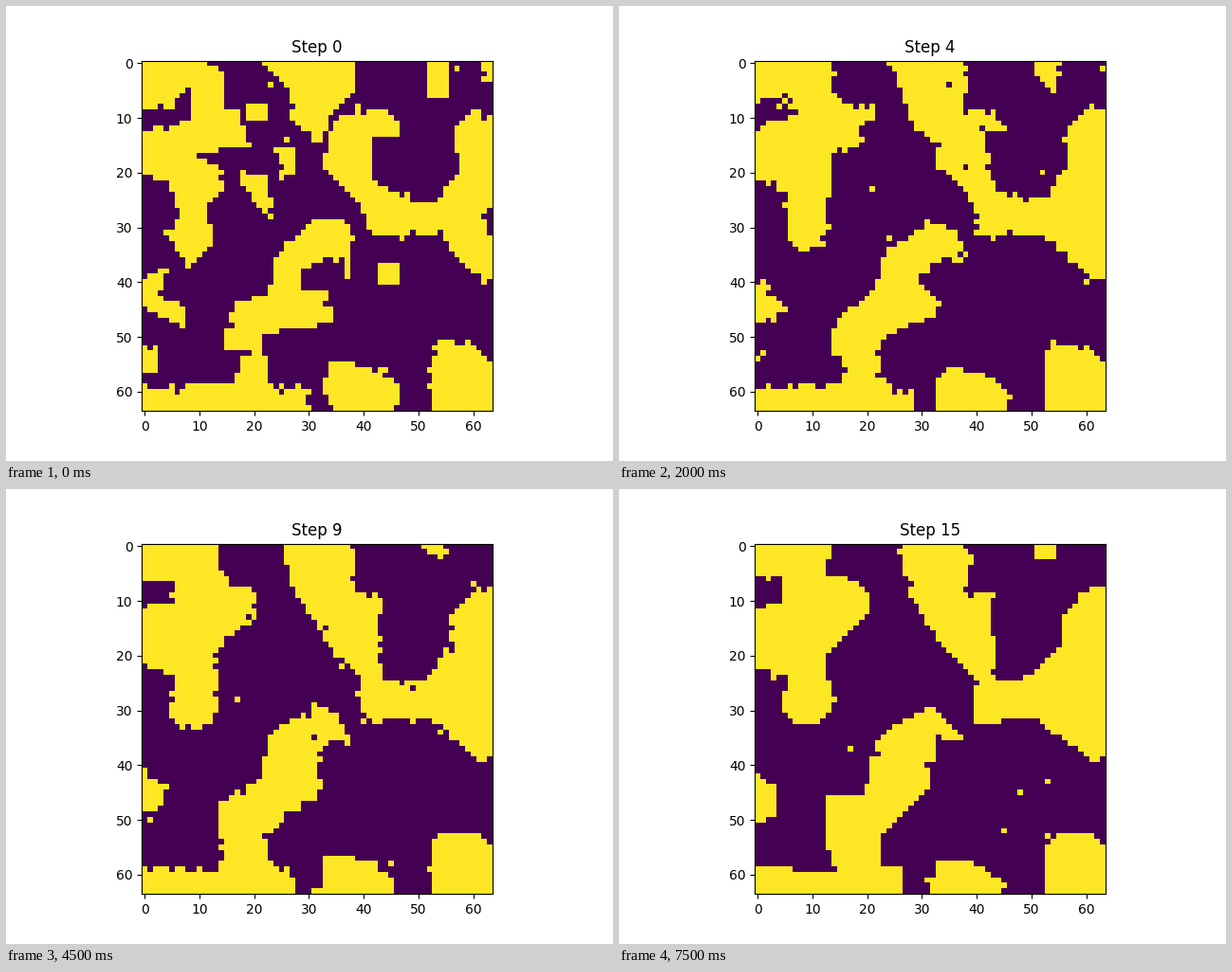
Recreate the animation shown at these times as a matplotlib script. Size 640 by 480 pixels, loop 8000 ms.

```python
import numpy as np
import matplotlib.pyplot as plt
from matplotlib.animation import FuncAnimation
from matplotlib.path import Path

N, STEPS = 64, 16
rows, cols = np.mgrid[:N, :N]
centers = np.column_stack([cols.ravel() + 0.5, rows.ravel() + 0.5])
cells = centers[:, 0] + 1j * centers[:, 1]


def blob(mask, *pts):
    mask |= Path(np.reshape(pts, (-1, 2))).contains_points(centers)


def box(mask, x, y, w, h):
    blob(mask, x, y, x + w, y, x + w, y + h, x, y + h)


def signed_distance(mask):
    gap = np.abs(cells[mask][:, None] - cells[~mask])
    field = np.empty(N * N)
    field[mask] = gap.min(axis=1) - 0.5
    field[~mask] = 0.5 - gap.min(axis=0)
    return field.reshape(N, N).clip(-3, 3)


# Domains at the first step
start = np.zeros(N * N, bool)
blob(start, 0,0, 12,0, 15,3, 15,9, 18,9, 19,16, 9,17, 15,20, 15,23, 12,26,
     13,34, 8,38, 7,34, 5,32, 7,28, 5,22, 0,21, 0,13, 9,11, 9,4, 5,8, 0,9)
blob(start, 22,0, 39,0, 39,6, 34,10, 33,15, 27,11, 27,6)
blob(start, 18,21, 23,21, 24,29, 22,28)
blob(start, 36,10, 43,9, 47,11, 47,14, 42,14, 42,22, 50,26, 54,26, 58,20,
     57,13, 60,9, 64,10, 64,28, 62,28, 64,33, 64,40, 62,40, 57,36, 55,32,
     42,32, 40,26, 33,20, 34,14)
blob(start, 32,29, 36,29, 38,31, 38,41, 36,36, 29,38, 29,42, 34,42, 35,48,
     22,50, 23,58, 25,61, 29,59, 31,64, 0,64, 0,60, 17,59, 19,53, 15,53,
     16,46, 24,41, 24,36)
blob(start, 0,40, 5,38, 3,43, 8,45, 8,49, 0,45)
blob(start, 34,55, 44,56, 47,61, 46,64, 35,64, 33,60)
blob(start, 54,51, 60,52, 64,55, 64,64, 53,64, 53,57)
box(start, 19, 8, 4, 3)
box(start, 52, 0, 4, 7)
box(start, 62, 0, 2, 4)
box(start, 25, 16, 3, 5)
box(start, 43, 37, 4, 4)
box(start, 0, 52, 3, 5)

# Domains at the last step
end = np.zeros(N * N, bool)
blob(end, 0,0, 14,0, 13,6, 19,7, 21,10, 21,13, 13,20, 14,30, 12,33, 8,33,
     5,30, 6,24, 0,23, 0,12, 5,11, 5,6, 0,6)
blob(end, 27,0, 37,0, 39,2, 39,9, 43,9, 44,25, 50,25, 56,18, 56,14, 62,8,
     64,8, 64,39, 62,40, 51,32, 40,33, 40,25, 33,17, 28,9, 27,3)
blob(end, 30,31, 33,30, 38,36, 33,36, 32,44, 23,53, 23,59, 27,59, 27,64,
     0,64, 0,59, 15,60, 13,54, 13,46, 20,46, 22,37, 26,33)
blob(end, 0,42, 4,44, 4,50, 0,51)
blob(end, 33,58, 39,58, 46,62, 45,64, 32,64)
blob(end, 53,53, 61,53, 64,55, 64,64, 53,64)
box(end, 51, 0, 4, 3)

first, last = signed_distance(start), signed_distance(end)


def spins(step):
    """Blend the domains, roughen their edges and flip a few lone spins."""
    rng = np.random.default_rng(step)
    t = (step / (STEPS - 1)) ** 0.7
    field = (1 - t) * first + t * last + rng.normal(0, 0.3, (N, N))
    grid = field > 0
    x, y = rng.integers(0, N, (2, 6))
    grid[y, x] ^= True
    return grid.astype(int)


frames = [spins(s) for s in range(STEPS)]

fig, ax = plt.subplots(figsize=(6.4, 4.8), dpi=100)
image = ax.imshow(frames[0], cmap="viridis", vmin=0, vmax=1)
title = ax.set_title("Step 0")


def update(step):
    image.set_data(frames[step])
    title.set_text(f"Step {step}")
    return image, title


anim = FuncAnimation(fig, update, frames=STEPS, interval=500, repeat=True,
                     repeat_delay=0, blit=False)
plt.show()
```
